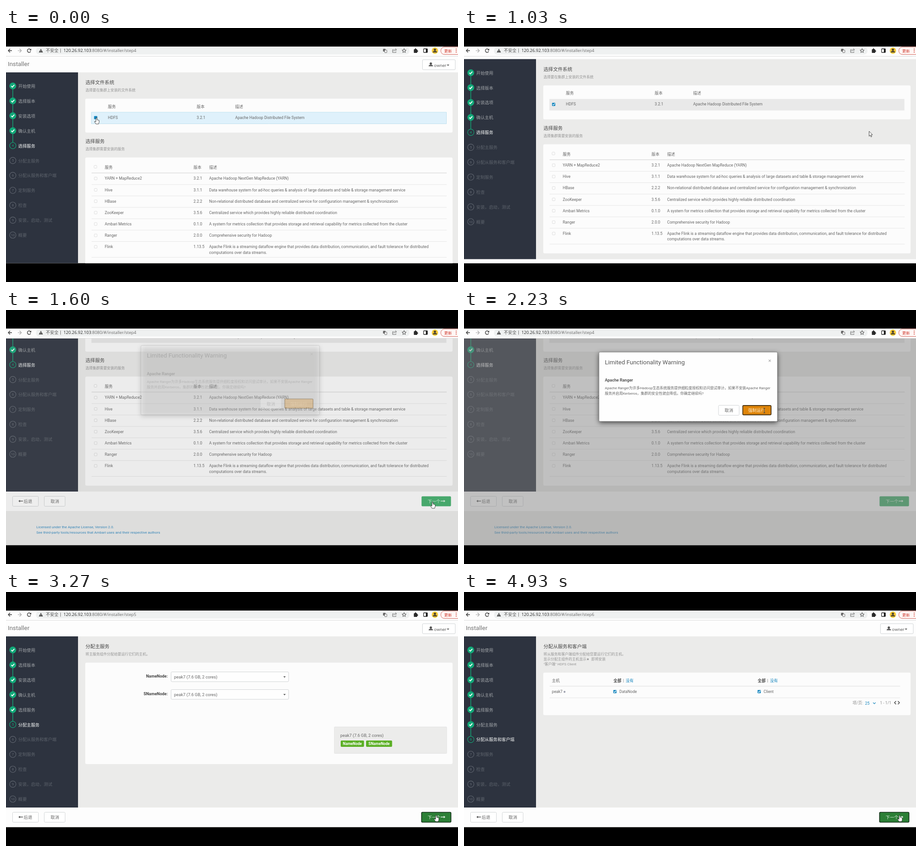
These frames come from a looping animation (998x561 px, 5010 ms). An HTML page with a canvas:

```html
<!DOCTYPE html>
<html lang="zh-CN">
<head>
<meta charset="utf-8">
<title>Installer</title>
<style>
html, body { margin: 0; width: 100%; height: 100%; overflow: hidden; background: #000; }
canvas { display: block; width: 998px; height: 561px; }
</style>
</head>
<body>
<canvas id="stage"></canvas>
<script>
const W = 998, H = 561, LOOP = 5010;
const canvas = document.getElementById('stage');
const c = canvas.getContext('2d');
const dpr = window.devicePixelRatio || 1;
canvas.width = W * dpr;
canvas.height = H * dpr;

const UI = 'Roboto, "Noto Sans CJK SC", "Noto Sans CJK", sans-serif';
const CHROME = '"Open Sans", "Noto Sans CJK SC", "Noto Sans CJK", sans-serif';
const GREEN = '#12a878', LINK = '#1585bd', INK = '#666', PANEL = '#fcfcfc', PAGE = '#ebebea';
const HOST = 'peak7';

const T = {
  check: 60, scroll: [960, 1200], modal: 1560, step5: 2350,
  click5: 3390, status: 3480, step6: 3870, statusEnd: 4080
};

const steps = ['开始使用', '选择版本', '安装选项', '确认主机', '选择服务', '分配主服务',
  '分配从服务和客户端', '定制服务', '检查', '安装，启动，测试', '概要'];

const services = [
  ['YARN + MapReduce2', '3.2.1', 'Apache Hadoop NextGen MapReduce (YARN)'],
  ['Hive', '3.1.1', 'Data warehouse system for ad-hoc queries & analysis of large datasets and table & storage management service'],
  ['HBase', '2.2.2', 'Non-relational distributed database and centralized service for configuration management & synchronization'],
  ['ZooKeeper', '3.5.6', 'Centralized service which provides highly reliable distributed coordination'],
  ['Ambari Metrics', '0.1.0', 'A system for metrics collection that provides storage and retrieval capability for metrics collected from the cluster'],
  ['Ranger', '2.0.0', 'Comprehensive security for Hadoop'],
  ['Flink', '1.13.5', 'Apache Flink is a streaming dataflow engine that provides data distribution, communication, and fault tolerance for distributed']
];

// Pointer stops: time, x, y, shape while resting there
const stops = [
  [0, 200, 198, 'hand'], [400, 200, 198, 'hand'],
  [850, 893, 222, 'arrow'], [1000, 893, 222, 'arrow'],
  [1300, 942, 424, 'hand'], [1620, 942, 424, 'hand'],
  [2060, 663, 222, 'beam'], [2300, 663, 222, 'beam'],
  [2460, 608, 222, 'hand'], [2820, 608, 222, 'hand'],
  [3250, 950, 493, 'hand'], [3400, 950, 493, 'hand'],
  [3800, 440, 212, 'arrow'], [3980, 440, 212, 'arrow'],
  [4280, 500, 262, 'arrow'], [4420, 500, 262, 'arrow'],
  [4860, 962, 493, 'hand'], [LOOP, 962, 493, 'hand']
];

const clamp = v => Math.max(0, Math.min(1, v));
const ease = v => { v = clamp(v); return v * v * (3 - 2 * v); };

function rect(x, y, w, h, fill) {
  c.fillStyle = fill;
  c.fillRect(x, y, w, h);
}

function box(x, y, w, h, r, fill, stroke, lw = 1) {
  c.beginPath();
  c.roundRect(x, y, w, h, r);
  if (fill) { c.fillStyle = fill; c.fill(); }
  if (stroke) { c.strokeStyle = stroke; c.lineWidth = lw; c.stroke(); }
}

function circle(x, y, r, fill, stroke, lw = 1) {
  c.beginPath();
  c.arc(x, y, r, 0, Math.PI * 2);
  if (fill) { c.fillStyle = fill; c.fill(); }
  if (stroke) { c.strokeStyle = stroke; c.lineWidth = lw; c.stroke(); }
}

// Points are flat x, y pairs relative to (x, y)
function trace(x, y, pts, close) {
  c.beginPath();
  for (let i = 0; i < pts.length; i += 2) c.lineTo(x + pts[i], y + pts[i + 1]);
  if (close) c.closePath();
}

function line(x, y, pts, color, lw = 1) {
  trace(x, y, pts);
  c.strokeStyle = color;
  c.lineWidth = lw;
  c.stroke();
}

function shape(x, y, pts, fill) {
  trace(x, y, pts, true);
  c.fillStyle = fill;
  c.fill();
}

// y is the middle of the capitals
function text(s, x, y, size, color, { weight = 400, align = 'left', font = UI } = {}) {
  c.font = `${weight} ${size}px ${font}`;
  c.textAlign = align;
  c.fillStyle = color;
  c.fillText(s, x, y + size * 0.36);
}

const bold = { weight: 700 };
const centered = { align: 'center' };
const rule = (x, y, w, color = '#e3e3e3') => rect(x, y, w, 1, color);

function checkbox(x, y, state) {
  if (!state) return box(x - 3, y - 3, 6, 6, 1, '#fff', '#d3d3d3', 0.8);
  box(x - 3.5, y - 3.5, 7, 7, 1, '#0f83bd');
  if (state === 'on') line(x, y, [-2, 0, -0.5, 1.7, 2.5, -2], '#fff', 1.2);
}

function star(x, y, r, color) {
  for (let i = 0; i < 3; i++) {
    const a = i * Math.PI / 3, dx = Math.cos(a) * r, dy = Math.sin(a) * r;
    line(x, y, [-dx, -dy, dx, dy], color, 1.2);
  }
}

function arrowIcon(x, y, dir, color) {
  line(x, y, [-5 * dir, 0, 4 * dir, 0], color, 1.5);
  shape(x, y, [5 * dir, 0, 1.5 * dir, -2.8, 1.5 * dir, 2.8], color);
}

function person(x, y, color) {
  circle(x, y - 2, 2.6, color);
  c.beginPath();
  c.ellipse(x, y + 4, 4.8, 3.2, 0, Math.PI, 0);
  c.fill();
}

function browserBar(step) {
  rect(0, 41, W, 22, '#fdfdfd');
  line(9, 50, [4, 0, -4, 0], '#333', 1.3);
  line(9, 50, [0, -4, -4, 0, 0, 4], '#333', 1.3);
  line(30, 50, [-4, 0, 4, 0], '#a0a0a0', 1.2);
  line(30, 50, [0, -4, 4, 0, 0, 4], '#a0a0a0', 1.2);
  c.beginPath();
  c.arc(51, 50, 3.8, 0.4, 5.5);
  c.strokeStyle = '#333';
  c.lineWidth = 1.4;
  c.stroke();
  shape(51, 50, [4.6, -4.6, 4.6, -0.6, 0.8, -0.6], '#333');

  box(66, 42.5, 825, 16, 8, '#eff1f1');
  shape(77, 50, [0, -4.2, 4.6, 4, -4.6, 4], '#4c4c4c');
  rect(76.5, 48.5, 1, 2.5, '#eee');
  rect(76.5, 52, 1, 1, '#eee');
  const f = { font: CHROME };
  text('不安全', 88, 50, 9.3, '#555', f);
  rect(120, 45.5, 1, 9, '#777');
  const ip = '120.26.92.103';
  text(ip, 127, 50, 9.4, '#222', f);
  const w = c.measureText(ip).width;
  text(':8080/#/installer/step' + step, 127 + w, 50, 9.4, '#666', f);

  box(832.5, 46, 5.5, 6, 1, '#666');
  box(836, 48.5, 5, 6, 1, '#eee', '#666', 0.9);
  line(858, 50, [-2, -2, -4.5, -2, -4.5, 4, 3, 4, 3, 2], '#666');
  line(858, 50, [-2, 1.5, -1, -1.5, 3, -2], '#666');
  line(858, 50, [1.5, -4.5, 4.5, -2, 1.5, 0.5], '#666');
  c.beginPath();
  for (let i = 0; i < 10; i++) {
    const a = i * Math.PI / 5 - Math.PI / 2, r = i % 2 ? 2.1 : 4.8;
    c.lineTo(879 + Math.cos(a) * r, 50.3 + Math.sin(a) * r);
  }
  c.closePath();
  c.strokeStyle = '#444';
  c.lineWidth = 1;
  c.stroke();
  box(900.5, 47, 7.5, 8, 1, '#2b2b2b');
  circle(904.2, 46.8, 1.7, '#2b2b2b');
  circle(908.2, 51, 1.7, '#2b2b2b');
  box(922, 46, 8.5, 8, 1, '#fff', '#222', 1.3);
  rect(927, 46, 3.5, 8, '#222');
  circle(947, 50, 7, '#f8cc38');
  person(947, 50, '#4c4430');
  box(960, 42, 60, 16.5, 8, '#fff7f5', '#d3655c');
  text('更新', 967.5, 50.5, 8.5, '#cf3c30', f);
  for (let i = -1; i < 2; i++) circle(994, 50 + i * 3.6, 1, '#cf3c30');
  rule(0, 62, W, '#dcdcdc');
}

function header() {
  rect(0, 63, W, 35, '#fdfdfd');
  text('Installer', 4, 79, 13.4, '#737373');
  box(919.5, 70, 72.5, 22, 2, '#fff', '#cfd3d5');
  person(938, 80.5, '#555');
  text('owner', 945, 82, 9.9, INK);
  shape(976, 82, [-2.7, -1.2, 2.7, -1.2, 0, 1.8], '#555');
}

function sidebar(current, bottom) {
  rect(0, 98, 159, bottom - 98, '#2d333f');
  steps.forEach((name, i) => {
    const y = 128 + i * 32.93;
    if (i < current) {
      rect(14.3, y + 7, 1.4, 19, GREEN);
      circle(15, y, 7.5, GREEN);
      line(15, y, [-3.3, 0.2, -1, 2.6, 3.4, -2.4], '#fff', 1.9);
      text(name, 27, y + 0.5, 9.4, '#a0a4a8');
    } else {
      const on = i === current;
      circle(15, y, 7, null, on ? GREEN : '#616771', 1.1);
      text(i, 15, y, 7.5, on ? GREEN : '#656b75', centered);
      text(name, 27, y + 0.5, 9.4, on ? '#b9bcbf' : '#5d636c', on ? bold : {});
    }
  });
}

function title(name, notes, y) {
  text(name, 175.5, y, 10.6, '#484848');
  notes.forEach((s, i) => text(s, 175.5, y + 17 + i * 11.3, 7.9, '#949494'));
}

function panel(y, bottom) {
  box(175, y, 811, bottom - y, 3, PANEL);
}

function button(x, y, w, label, cx) {
  box(x, y, w, 22, 2, '#fff', '#d2d5d7');
  text(label, cx, y + 11.5, 9.4, INK, centered);
}

function footer(y, next) {
  rect(0, y, W, 43, '#fdfdfd');
  button(14.5, y + 10.5, 57, '后退', 48.5);
  arrowIcon(32.5, y + 21, -1, '#555');
  button(84.5, y + 10.5, 46, '取消', 108);
  const [fill, edge, ink] = {
    off: ['#91c998', null, '#e4f3e6'],
    ready: ['#3fae6a', null, '#d8f0df'],
    hot: ['#2c7f36', '#14301a', '#e5f1e6']
  }[next];
  box(917.5, y + 10.5, 65, 22, 2, fill, edge, 1.6);
  text('下一个', 931, y + 21.5, 9.4, ink);
  arrowIcon(965, y + 21, 1, ink);
}

function columns(labels, xs, y, size = 8.7, color = INK) {
  labels.forEach((s, i) => text(s, xs[i], y, size, color));
}

function servicesPage(t, mouse, next) {
  rect(0, 63, W, 600, PAGE);
  header();
  sidebar(4, 540);
  title('选择文件系统', ['选择要在集群上安装的文件系统'], 120);
  panel(156, 231);
  const xs = [225, 421, 506];
  columns(['服务', '版本', '描述'], xs, 173.5);
  const hover = mouse.y < 211 && t < 900;
  rect(188.5, 186, 784, 25.5, hover ? '#dff1fb' : '#e9e9e9');
  if (hover) box(188.5, 186, 784, 25.5, 0, null, '#b5dcec', 0.8);
  checkbox(198, 198, t < T.check ? 'pressed' : 'on');
  columns(['HDFS', '3.2.1', 'Apache Hadoop Distributed File System'], xs, 197.5);

  title('选择服务', ['选择集群需要安装的服务'], 250.5);
  panel(286, 527);
  const cols = [218, 414, 448.5];
  checkbox(197.5, 306.5);
  columns(['服务', '版本', '描述'], cols, 308);
  rect(189, 319.5, 784, 1.5, '#dedede');
  services.forEach((row, i) => {
    const y = 332.3 + i * 25.15;
    checkbox(198, y);
    columns(row, cols, y);
    rule(189, i === 6 ? 506 : y + 13, 784, '#e6e6e6');
  });
  text('computations over data streams.', 448.5, 495.5, 8.7, INK);
  footer(540, next);
  text('Licensed under the Apache License, Version 2.0.', 67, 618, 8, '#2c87c0');
  text('See third-party tools/resources that Ambari uses and their respective authors', 67, 630.5, 8, '#2c87c0');
}

function mastersPage(next) {
  rect(0, 63, W, 457, PAGE);
  header();
  sidebar(5, 476);
  title('分配主服务', ['将主服务组件分配给要运行它们的主机。'], 120);
  panel(156, 380);
  const host = HOST + ' (7.6 GB, 2 cores)';
  ['NameNode', 'SNameNode'].forEach((name, i) => {
    const y = 176.5 + i * 39;
    text(name + ':', 357, y + 9, 9, '#444', { weight: 700, align: 'right' });
    box(364.5, y, 259.5, 21.5, 2, '#fefefe', '#d0d3d5');
    text(host, 371, y + 11, 9.3, INK);
    shape(615, y + 11, [-2.7, -1.2, 2.7, -1.2, 0, 1.8], '#555');
  });
  box(725, 298, 248, 58.5, 1, '#ececeb', '#e2e2e2');
  text(host, 738, 317, 9.3, INK);
  box(739, 328, 51.5, 14, 2, '#5baf25');
  text('NameNode', 764.7, 335, 8.3, '#fff', { weight: 700, align: 'center' });
  box(795, 328, 57.5, 14, 2, '#5baf25');
  text('SNameNode', 823.7, 335, 8.3, '#fff', { weight: 700, align: 'center' });
  footer(476, next);
}

function slavesPage(mouse, next) {
  rect(0, 63, W, 457, PAGE);
  header();
  sidebar(6, 476);
  title('分配从服务和客户端', ['将从服务和客户端组件分配给您要运行它们的主机。',
    '显示分配主组件的主机显示', '"客户端" HDFS Client'], 120);
  star(273.5, 148.5, 2.2, '#949494');
  text('即将安装', 281, 148.3, 7.9, '#949494');
  panel(178, 272);
  text('主机', 194, 196, 8.7, INK);
  const hover = mouse.y > 207 && mouse.y < 234;
  if (hover) rect(189, 207.5, 774, 26.5, '#e2f2fa');
  rule(189, 207.5, 774, hover ? '#c4e2ef' : '#dedede');
  rule(189, 233.3, 774, hover ? '#c4e2ef' : '#e4e4e4');
  text(HOST, 194, 220, 8.7, INK);
  star(222, 220.5, 2.3, '#8f93a3');
  [[330, 'DataNode'], [648.5, 'Client']].forEach(([x, name]) => {
    text('全部', x, 196, 8.7, '#444', bold);
    text('|', x + 21, 196, 8.7, '#777');
    text('没有', x + 27, 196, 8.7, LINK, { weight: 500 });
    checkbox(x + 3.2, 220, 'on');
    text(name, x + 13, 220, 8.7, INK);
  });
  text('项/页:', 858, 245, 8.7, '#8c8c8c');
  text('25', 885.5, 245.5, 8.7, LINK);
  line(906, 245.5, [-2.8, -1.4, 0, 1.4, 2.8, -1.4], LINK, 1.3);
  text('1 - 1/1', 918.5, 245, 8.7, '#8c8c8c');
  line(952, 244.5, [2, -3.5, -1.5, 0, 2, 3.5], '#444', 1.5);
  line(960, 244.5, [-2, -3.5, 1.5, 0, -2, 3.5], '#444', 1.5);
  footer(476, next);
}

function dialog(p) {
  rect(0, 63, W, 457, `rgba(125,125,125,${0.48 * p})`);
  c.save();
  c.globalAlpha = p;
  c.translate(0, -20 * (1 - p));
  c.shadowColor = 'rgba(0,0,0,.65)';
  c.shadowBlur = 11 * dpr;
  c.shadowOffsetY = 3 * dpr;
  box(298, 93, 394, 153, 2, '#fefefe');
  c.shadowColor = 'transparent';
  box(298, 93, 394, 153, 2, null, '#777', 0.8);
  text('Limited Functionality Warning', 311, 115, 13.4, '#555');
  line(675, 112, [-2.4, -2.4, 2.4, 2.4], '#aaa', 1.2);
  line(675, 112, [2.4, -2.4, -2.4, 2.4], '#aaa', 1.2);
  text('Apache Ranger', 311, 155, 9.1, '#555', bold);
  text('Apache Ranger为许多Hadoop生态系统服务提供细粒度授权和访问尝试审计。如果不安装Apache Ranger', 311, 172.5, 7.95, INK);
  text('服务并启用Kerberos，集群的安全性就会降低。你确定继续吗?', 311, 184.5, 7.95, INK);
  button(562, 210.5, 45.5, '取消', 585);
  box(615.5, 211, 62.5, 20.5, 2, '#df8509', '#4d3510', 1.8);
  text('强制运行', 646, 222, 9.4, '#fff0d8', centered);
  c.restore();
}

function statusBar() {
  rect(0, 505, 331, 15, '#fdd657');
  text('正在等待 120.26.92.103 的响应...', -4, 512.5, 8.1, '#5a4c22', { font: CHROME });
}

function pointerAt(t) {
  let i = 0;
  while (i < stops.length - 2 && t >= stops[i + 1][0]) i++;
  const a = stops[i], b = stops[i + 1];
  const k = ease((t - a[0]) / (b[0] - a[0]));
  const x = a[1] + (b[1] - a[1]) * k, y = a[2] + (b[2] - a[2]) * k;
  const rest = [a, b].find(s => Math.hypot(x - s[1], y - s[2]) < 12);
  return { x, y, kind: rest ? rest[3] : 'arrow' };
}

function pointer({ x, y, kind }) {
  c.lineJoin = 'round';
  if (kind === 'beam') {
    line(x, y, [-2, -5, 2, -5], '#333');
    line(x, y, [0, -5, 0, 5], '#333');
    line(x, y, [-2, 5, 2, 5], '#333');
  } else {
    const pts = kind === 'arrow'
      ? [0, 0, 0, 11, 2.6, 8.7, 4.2, 12.6, 6, 11.8, 4.3, 8, 7.6, 7.8]
      : [-1, 0, 0.8, 0, 1.2, 5, 3, 4.8, 3.4, 5.6, 5.2, 5.6, 5.7, 6.8, 5.5, 10.5, 4.4, 14,
        -1.4, 14, -4.6, 9.2, -4, 7.8, -1.6, 9.2];
    shape(x, y, pts, '#fff');
    trace(x, y, pts, true);
    c.strokeStyle = '#333';
    c.lineWidth = 0.9;
    c.stroke();
  }
  c.lineJoin = 'miter';
}

function draw(t) {
  c.setTransform(dpr, 0, 0, dpr, 0, 0);
  rect(0, 0, W, H, '#000');
  const mouse = pointerAt(t);
  const step = t < T.step5 ? 4 : t < T.step6 ? 5 : 6;
  const onNext = mouse.x > 917 && mouse.y > (step === 4 ? 411 : 486);

  c.save();
  c.beginPath();
  c.rect(0, 41, W, 478.5);
  c.clip();
  if (step === 4) {
    const [from, to] = T.scroll;
    c.save();
    c.translate(0, -139 * ease((t - from) / (to - from)));
    servicesPage(t, mouse, onNext && t < T.modal ? 'hot' : 'ready');
    c.restore();
    if (t >= T.modal) dialog(ease((t - T.modal) / 120));
  } else if (step === 5) {
    mastersPage(onNext && t < T.click5 ? 'hot' : 'off');
  } else {
    slavesPage(mouse, onNext ? 'hot' : 'off');
  }
  browserBar(step);
  if (t >= T.status && t < T.statusEnd) statusBar();
  pointer(mouse);
  c.restore();
}

const start = performance.now();
function tick() {
  draw((performance.now() - start) % LOOP);
  requestAnimationFrame(tick);
}
tick();
</script>
</body>
</html>
```
